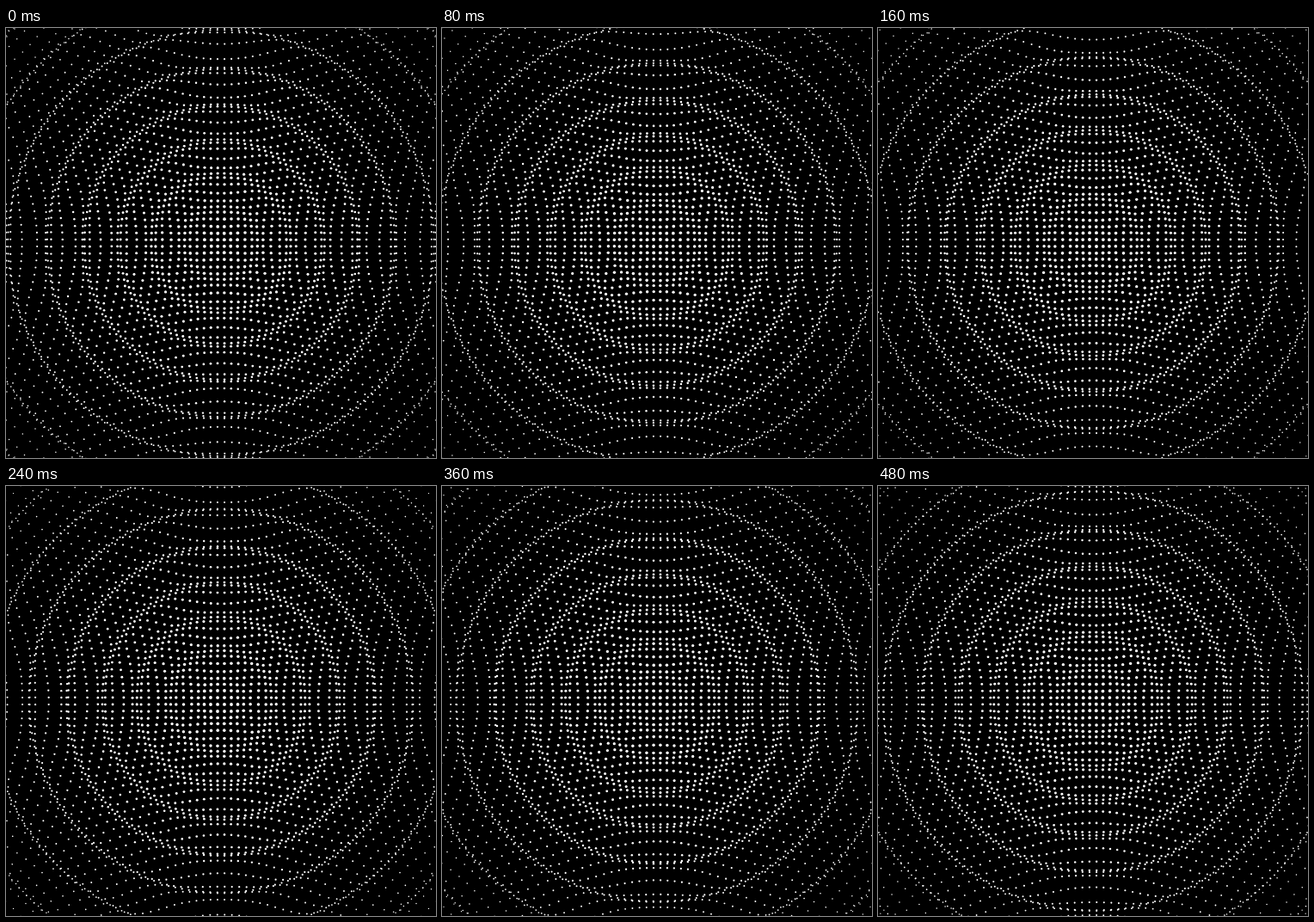
An HTML page with a canvas for the animation above (520 ms loop, 500 by 500 pixels).

```html
<!DOCTYPE html>
<html lang="en">
<head>
<meta charset="utf-8">
<title>Dot ripple</title>
<style>
  html, body { margin: 0; width: 100%; height: 100%; overflow: hidden; background: #000; }
  canvas { display: block; width: 500px; height: 500px; }
</style>
</head>
<body>
<canvas id="stage" width="500" height="500"></canvas>
<script>
  const SIZE = 500, MID = SIZE / 2;
  const CELLS = 64, GAP = 7.75;
  const WAVE = 37.6;          // distance between rings, before the bulge
  const START = 153.9;        // radius of one ring at time zero
  const SWELL = 1 / 30;       // wave displacement relative to radius
  const BULGE = 1.55e-6;      // lens-like widening towards the edges
  const STEP = 40, STEPS = 13;

  const ctx = document.getElementById('stage').getContext('2d');
  const dots = [];

  for (let row = 0; row < CELLS; row++) {
    for (let col = 0; col < CELLS; col++) {
      const x = (col + 0.5 - CELLS / 2) * GAP;
      const y = (row + 0.5 - CELLS / 2) * GAP;
      const dist = Math.hypot(x, y);
      dots.push({ x, y, dist, size: Math.max(0.5, 1.95 - 0.0042 * dist) });
    }
  }

  function draw(step) {
    const ring = START + WAVE * step / STEPS;
    ctx.fillStyle = '#000';
    ctx.fillRect(0, 0, SIZE, SIZE);
    ctx.fillStyle = '#fff';
    for (const { x, y, dist, size } of dots) {
      const wave = Math.sin(2 * Math.PI * (ring - dist) / WAVE);
      const scale = 1 + BULGE * dist * dist + SWELL * wave;
      ctx.beginPath();
      ctx.arc(MID + x * scale, MID + y * scale, size, 0, 2 * Math.PI);
      ctx.fill();
    }
  }

  let shown = -1;
  function tick() {
    const step = Math.floor(performance.now() / STEP) % STEPS;
    if (step !== shown) draw(shown = step);
    requestAnimationFrame(tick);
  }
  tick();
</script>
</body>
</html>
```
